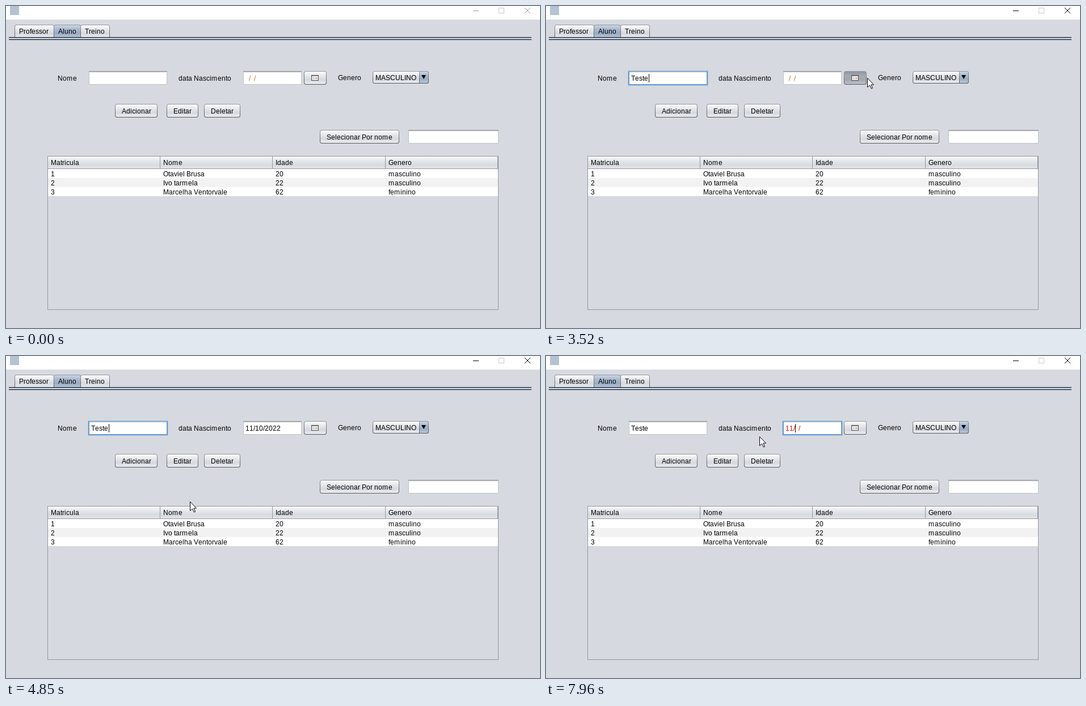
Write an HTML page with a canvas that moves like this. It is 941 by 569 pixels and loops after 8 s.

```html
<!DOCTYPE html>
<html lang="pt">
<head>
<meta charset="utf-8">
<style>
html, body { margin: 0; width: 941px; height: 569px; overflow: hidden; background: #d6d9df; }
canvas { display: block; }
</style>
</head>
<body>
<canvas id="stage" width="941" height="569"></canvas>
<script>
const ctx = document.getElementById('stage').getContext('2d');
const LOOP = 8000;

// Pointer way points: time, x, y
const path = [
  [40, 859, 569], [250, 560, 430], [500, 190, 310], [610, 160, 262], [770, 212, 132],
  [2530, 212, 132], [2650, 250, 148], [2760, 300, 156], [2890, 374, 98],
  [3030, 374, 98], [3200, 450, 122], [3340, 548, 128], [3500, 566, 127],
  [3890, 566, 127], [4010, 574, 222], [4130, 420, 272], [4250, 270, 257],
  [4400, 285, 281], [4560, 324, 264], [4690, 324, 257],
  [5100, 324, 257], [5250, 362, 200], [5400, 436, 160], [5560, 512, 140], [5660, 517, 140],
  [5830, 517, 140], [5990, 538, 131], [6120, 510, 129], [6220, 487, 129],
  [6600, 398, 129], [6720, 367, 140], [6800, 376, 142], [LOOP, 376, 142]
];
const caretResets = [850, 1420, 1910, 2080, 2160, 2240, 4850, 7170, 7800, 7960];

const skins = {
  normal: ['#fcfcfd', '#e6e8eb', '#d5d8de', '#eceef1'],
  hover: ['#ffffff', '#f6f7f9', '#eceef1', '#ffffff'],
  pressed: ['#8f949d', '#a4a9b2', '#a2a7b0', '#bcc1ca'],
  blue: ['#c9d5e4', '#a9b9ce', '#9aacc3', '#bac9db'],
  light: ['#ffffff', '#f8fbfd', '#eff4f8', '#ffffff'],
  tan: ['#b9b8b6', '#c3c1be', '#bfbdb9', '#cfcdca']
};
const rows = [
  ['1', 'Otaviel Brusa', '20', 'masculino'],
  ['2', 'Ivo tarmela', '22', 'masculino'],
  ['3', 'Marcelha Ventorvale', '62', 'feminino']
];
const columns = [74, 272, 470, 669];
const days = ['dom.', 'seg.', 'ter.', 'qua.', 'qui.', 'sex.', 'sáb.'];

const between = (v, a, b) => v >= a && v < b;
const inside = (p, x, y, w, h) => between(p.x, x, x + w) && between(p.y, y, y + h);

function rect(x, y, w, h, fill) {
  ctx.fillStyle = fill;
  ctx.fillRect(x, y, w, h);
}

function round(x, y, w, h, r, fill) {
  ctx.beginPath();
  ctx.roundRect(x, y, w, h, r);
  ctx.fillStyle = fill;
  ctx.fill();
}

function shade(y, h, colors) {
  const g = ctx.createLinearGradient(0, y, 0, y + h);
  colors.forEach((c, i) => g.addColorStop(i / (colors.length - 1), c));
  return g;
}

// Glyphs advance by whole pixels, as in hinted screen text
function advance(c, size) {
  return c === 'm' && size === 12 ? 11 : Math.round(ctx.measureText(c).width);
}

function setFont(size) {
  ctx.font = size + 'px "Liberation Sans", Arial, sans-serif';
}

function textWidth(s, size = 12) {
  setFont(size);
  return [...s].reduce((w, c) => w + advance(c, size), 0);
}

function text(s, x, y, color = '#000', size = 12) {
  setFont(size);
  ctx.fillStyle = color;
  for (const c of s) {
    ctx.fillText(c, x, y);
    x += advance(c, size);
  }
  return x;
}

function box(x, y, w, h, skin, r = 4) {
  round(x, y, w, h, r, shade(y, h, skin === 'light' ? ['#a9b4c0', '#7f8b98'] : ['#96999f', '#53565c']));
  const inner = Array.isArray(r) ? r.map(v => Math.max(0, v - 1)) : Math.max(0, r - 1);
  round(x + 1, y + 1, w - 2, h - 2, inner, shade(y + 1, h - 2, skins[skin]));
}

function button(label, x, y, w, h, skin = 'normal', color = '#000', size = 12) {
  box(x, y, w, h, skin);
  const tx = x + Math.round((w - textWidth(label, size)) / 2);
  text(label, tx, y + Math.round(h / 2) + (size > 11 ? 5 : 4), color, size);
}

function field(x, y, w, h, focused) {
  if (focused) {
    round(x - 2, y - 2, w + 4, h + 4, 2, '#a9c5e0');
    rect(x - 1, y - 1, w + 2, h + 2, '#6a9cca');
  } else {
    rect(x, y, w, h, '#c0c4ca');
    rect(x, y - 1, w, 1, '#8a8d93');
  }
  rect(x + 1, y, w - 2, h - 1, '#fff');
  rect(x + 1, y, w - 2, 1, '#c9cacc');
  rect(x + 1, y + 1, w - 2, 1, '#eeeeef');
}

function triangle(x, y, w, h, color) {
  ctx.beginPath();
  ctx.moveTo(x, y);
  ctx.lineTo(x + w, y);
  ctx.lineTo(x + w / 2, y + h);
  ctx.fillStyle = color;
  ctx.fill();
}

function combo(label, x, y, w, h, textY) {
  box(x, y, w, h, 'normal');
  box(x + w - 17, y, 17, h, 'blue', [0, 4, 4, 0]);
  text(label, x + 5, textY);
  triangle(x + w - 13, y + h / 2 - 4, 8, 7, '#000');
}

function spinner(x, y) {
  box(x, y, 18, 12, 'normal', [4, 4, 0, 0]);
  box(x, y + 11, 18, 13, 'blue', [0, 0, 4, 4]);
  triangle(x + 6, y + 8, 6, -4, '#555');
  triangle(x + 6, y + 15, 6, 4, '#000');
}

function pointerAt(t) {
  if (t < path[0][0]) return null;
  const i = Math.max(1, path.findIndex(k => k[0] > t));
  const [a, x, y] = path[i - 1], [b, u, v] = path[i];
  const f = (t - a) / (b - a);
  return { x: Math.round(x + (u - x) * f), y: Math.round(y + (v - y) * f) };
}

function caretOn(t) {
  const last = caretResets.filter(r => r <= t).pop();
  return last !== undefined && Math.floor((t - last) / 500) % 2 === 0;
}

function drawArrow({ x, y }) {
  const pts = [[0, 0], [0, 16], [4, 12.5], [7, 18.5], [9, 17.5], [6.5, 11.5], [11, 11.5]];
  ctx.beginPath();
  pts.forEach(([a, b]) => ctx.lineTo(x + a + .5, y + b + .5));
  ctx.closePath();
  ctx.fillStyle = '#fff';
  ctx.fill();
  ctx.strokeStyle = '#000';
  ctx.lineWidth = 1;
  ctx.stroke();
}

function drawBeam({ x, y }) {
  rect(x, y - 7, 1, 15, '#000');
  for (const end of [y - 8, y + 8]) {
    rect(x - 3, end, 3, 1, '#000');
    rect(x + 1, end, 3, 1, '#000');
  }
}

function drawWindow(active) {
  rect(0, 0, 941, 569, '#d6d9df');
  rect(0, 0, 941, 24, '#fff');
  rect(7, 0, 16, 16, '#b4c2d2');
  const ink = active ? '#000' : '#999';
  rect(823, 8, 10, 1, ink);
  ctx.lineWidth = 1;
  ctx.strokeStyle = '#ccc';
  ctx.strokeRect(868.5, 3.5, 9, 9);
  ctx.strokeStyle = ink;
  ctx.beginPath();
  ctx.moveTo(914, 3); ctx.lineTo(924, 13);
  ctx.moveTo(924, 3); ctx.lineTo(914, 13);
  ctx.stroke();

  const tab = (label, x, w, skin) => {
    box(x, 33, w, 24, skin, [4, 4, 0, 0]);
    text(label, x + 8, 49);
  };
  tab('Professor', 15, 70, 'normal');
  tab('Treino', 131, 52, 'normal');
  tab('Aluno', 84, 48, 'blue');
  rect(5, 55, 921, 5, '#05070f');
  rect(5, 56, 921, 3, '#b5c8dc');
}

function drawTable(p) {
  rect(73, 265, 795, 272, '#9297a1');
  rect(74, 266, 793, 270, '#d6d9df');
  rect(74, 266, 793, 22, shade(266, 22, ['#f7f8fa', '#e6e8ec', '#d8dbe0', '#e3e5e9']));
  if (p && inside(p, 74, 266, 197, 22)) rect(74, 266, 197, 22, shade(266, 22, skins.hover));
  rect(74, 287, 793, 1, '#9297a1');
  for (const x of [271, 469, 668, 866]) rect(x, 266, 1, 22, '#9297a1');
  ['Matricula', 'Nome', 'Idade', 'Genero'].forEach((s, i) => text(s, columns[i] + 5, 281));
  rows.forEach((row, r) => {
    rect(74, 288 + r * 16, 793, 16, r % 2 ? '#f2f2f2' : '#fff');
    row.forEach((s, i) => text(s, columns[i] + 5, 301 + r * 16));
  });
}

function drawCalendar(p, t) {
  rect(168, 141, 399, 229, '#5d6066');
  rect(169, 142, 397, 227, '#d6d9df');
  combo('outubro', 171, 149, 84, 24, 166);
  spinner(257, 149);
  rect(278, 149, 268, 24, '#fff');
  text('2022', 544 - textWidth('2022'), 166);
  spinner(546, 149);

  const overCol = Math.floor((p.x - 209) / 51), overRow = Math.floor((p.y - 175) / 27);
  for (let r = 0; r < 7; r++) {
    const y = 177 + 27 * r;
    button(r ? String(39 + r) : '', 171, y, 36, 24, 'light', '#6b6b6b', 11);
    for (let c = 0; c < 7; c++) {
      const x = 211 + 51 * c, n = (r - 1) * 7 + c - 5;
      if (!r) button(days[c], x, y, 47, 24, 'light', c ? '#0a5fa8' : '#222', 11);
      else if (between(n, 1, 32)) {
        const over = c === overCol && r === overRow;
        const skin = over ? (t >= 4690 ? 'pressed' : 'hover') : n === 2 ? 'tan' : 'normal';
        button(String(n), x, y, 47, 24, skin, '#000', 11);
      }
    }
  }
}

function nameAt(t) {
  return 'Teste'.slice(0, [1420, 1910, 2080, 2160, 2240].filter(k => k <= t).length);
}

function drawDate(t, p, focused) {
  field(418, 116, 103, 23, focused);
  const date = '11/10/2022';
  if (t < 4850) text('  /  /    ', 422, 132, '#c06a18');
  else if (t < 7090) {
    text(date, 422, 132);
    if (!focused) return;
    let start = 422;
    for (const c of date) {
      const w = advance(c, 12);
      if (start + w / 2 >= p.x) break;
      start += w;
    }
    const end = 422 + textWidth(date);
    ctx.save();
    ctx.beginPath();
    ctx.rect(start, 119, end - start, 16);
    ctx.clip();
    rect(start, 119, end - start, 16, '#39698a');
    text(date, 422, 132, '#fff');
    ctx.restore();
  } else {
    const typed = t < 7800 ? '' : t < 7960 ? '1' : '11/';
    const rest = t < 7800 ? '  /  /    ' : t < 7960 ? ' /  /    ' : '  /    ';
    const caret = text(typed, 422, 132, '#f00');
    text(rest, caret, 132, '#f00');
    if (t >= 7170 && caretOn(t)) rect(caret, 120, 1, 15, '#000');
  }
}

function draw(t) {
  const p = pointerAt(t);
  const open = between(t, 3600, 4850);
  const nameFocus = between(t, 850, 3600) || between(t, 4850, 6220);
  const over = (...area) => p && inside(p, ...area);
  const skin = (...area) => over(...area) ? 'hover' : 'normal';

  drawWindow(t >= 850);
  text('Nome', 91, 132);
  field(146, 116, 138, 23, nameFocus);
  const caret = text(nameAt(t), 150, 132);
  if (nameFocus && caretOn(t)) rect(caret + (t >= 2240), 120, 1, 15, '#000');

  text('data Nascimento', 304, 132);
  drawDate(t, p, t >= 6220);
  box(525, 115, 40, 24, between(t, 3400, 3600) ? 'pressed' : skin(525, 115, 40, 24));
  rect(538, 122, 13, 10, '#4c4c4c');
  rect(539, 123, 11, 8, '#f0f0f0');
  rect(539, 123, 11, 1, '#8d98a8');
  rect(540, 125, 4, 5, '#dadada');
  rect(545, 126, 4, 3, '#d9b9a0');

  text('Genero', 585, 131);
  combo('MASCULINO', 646, 115, 99, 22, 131);
  button('Adicionar', 192, 173, 75, 24);
  button('Editar', 283, 173, 56, 24);
  button('Deletar', 349, 173, 64, 24, skin(349, 173, 64, 24));
  const covered = open && p.x < 567;
  button('Selecionar Por nome', 553, 219, 140, 24, covered ? 'normal' : skin(553, 219, 140, 24));
  field(709, 220, 159, 23);
  drawTable(p);
  if (open) drawCalendar(p, t);

  if (!p) return;
  const beam = !open && (over(146, 116, 138, 23) || over(418, 116, 103, 23)) || between(t, 6220, 6780);
  (beam ? drawBeam : drawArrow)(p);
}

const begin = performance.now();
function tick() {
  draw((performance.now() - begin) % LOOP);
  requestAnimationFrame(tick);
}
tick();
</script>
</body>
</html>
```
